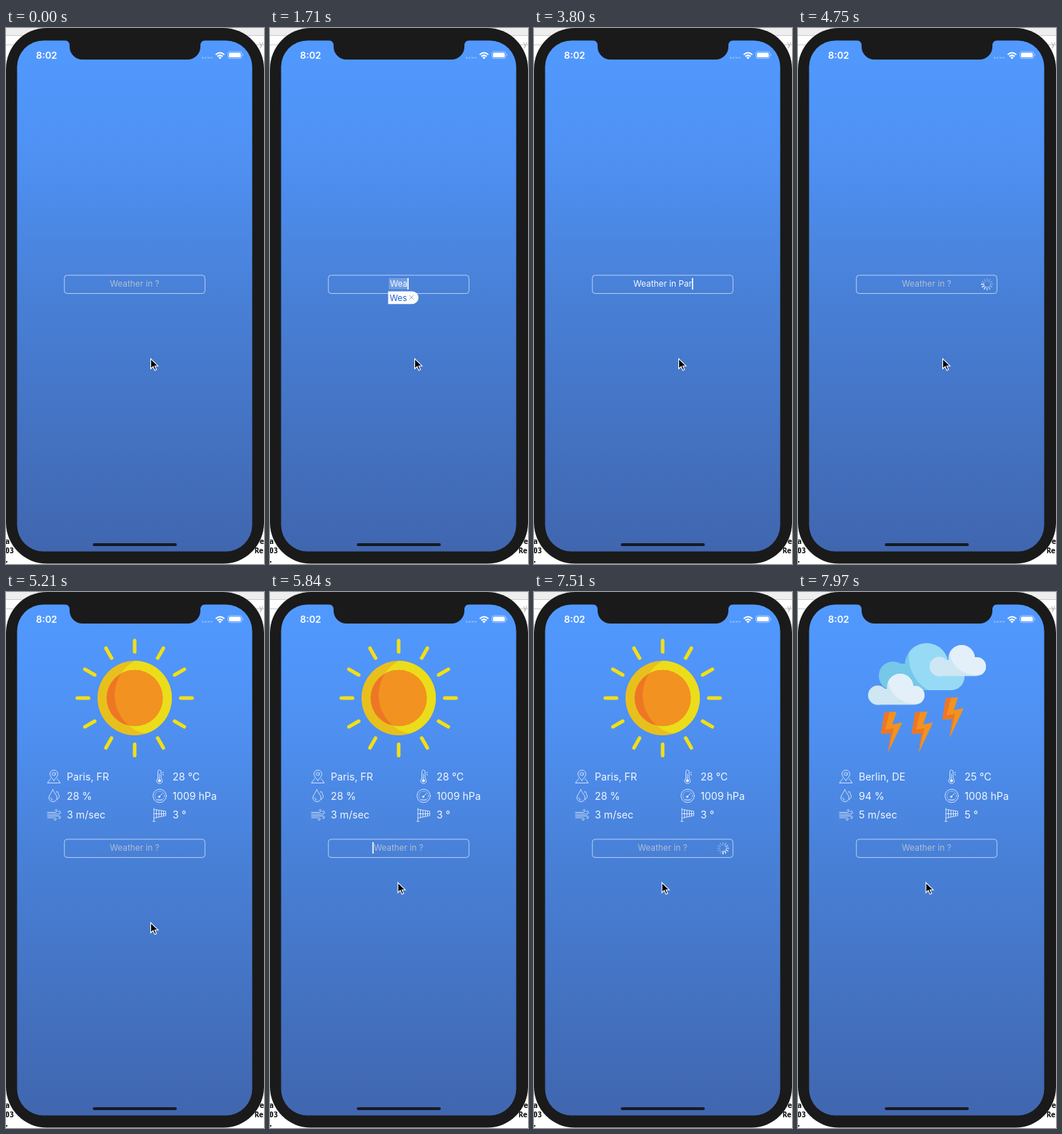
These frames come from a looping animation (361 px wide and 748 px high, 8000 ms). An HTML page:

```html
<!DOCTYPE html>
<html lang="en">
<head>
<meta charset="utf-8">
<title>Weather</title>
<style>
  html, body { margin: 0; width: 100%; height: 100%; overflow: hidden; background: #f4f4f4; }
  svg { display: block; width: 361px; height: 748px; font-family: Inter, "Open Sans", sans-serif; }
  .line { fill: none; stroke: #fff; stroke-opacity: .8; stroke-width: .9; stroke-linecap: round; stroke-linejoin: round; }
  .label { fill: #fff; fill-opacity: .93; font-size: 14.2px; }
  .field { font-size: 11.8px; text-anchor: middle; }
  .log { font: bold 10px "DejaVu Sans Mono", monospace; }
</style>
</head>
<body>
<svg viewBox="0 0 361 748">
  <defs>
    <linearGradient id="sky" x2="0" y2="1">
      <stop offset="0" stop-color="#5199ff"/>
      <stop offset=".22" stop-color="#4f91f3"/>
      <stop offset=".5" stop-color="#4880d7"/>
      <stop offset="1" stop-color="#4066af"/>
    </linearGradient>
    <clipPath id="sunLight"><circle cx="207" cy="144" r="55"/></clipPath>
    <clipPath id="cloudLight"><circle cx="211" cy="89" r="56"/></clipPath>
    <clipPath id="puffLight"><circle cx="249" cy="78" r="38"/></clipPath>
    <g id="backCloud">
      <circle cx="180" cy="102" r="30.5"/><circle cx="133" cy="117" r="20"/>
      <circle cx="214" cy="118" r="19"/><rect x="131" y="100" width="83" height="37"/>
    </g>
    <g id="puffShape">
      <circle cx="229" cy="92.500" r="18.500"/><circle cx="197.500" cy="104" r="13.500"/>
      <circle cx="250" cy="104" r="13"/><rect x="197" y="95" width="53" height="22.300"/>
    </g>
    <g id="puff">
      <use href="#puffShape" fill="#cfe7f3"/>
      <use href="#puffShape" fill="#e3f0f9" clip-path="url(#puffLight)"/>
    </g>
    <g id="bolt">
      <path fill="#f29220" d="M121 168 138 167 132 185 146 182 126 224 130 197 116 198Z"/>
      <path fill="#ee7624" d="M121 168 128 167.600 122 192 134 190 126 224 130 197 116 198Z"/>
    </g>
  </defs>

  <!-- Desktop showing around the device corners -->
  <rect width="361" height="748" fill="#fff"/>
  <rect width="361" height="11" fill="#eee"/>
  <path d="M0 10.500H361M0 23.500H361" stroke="#ccc"/>
  <g class="log">
    <text x="-1" y="720">a</text><text x="-1" y="733">03</text><text x="-2" y="746">.</text>
    <text x="355" y="720">e</text><text x="348" y="733">Re</text>
    <text x="354" y="26" fill="#aaa" style="font-weight:400">y</text>
  </g>

  <rect width="361" height="747.500" rx="57" fill="#1a1a1a"/>
  <rect x="15.500" y="17.500" width="329" height="713" rx="37" fill="url(#sky)"/>
  <path fill="#1a1a1a" d="M81 17Q89 17 89 25V26A18 18 0 0 0 107 44H254A18 18 0 0 0 272 26V25Q272 17 280 17Z"/>
  <rect x="121.500" y="719" width="117.500" height="4" rx="2" fill="#171a20"/>

  <!-- Status bar -->
  <text x="42" y="42.500" fill="#fff" font-size="13.200" font-weight="600">8:02</text>
  <g fill="#fff">
    <path d="M274 41.500H289" stroke="#fff" stroke-opacity=".35" stroke-width="2" stroke-dasharray="2.500 1.600"/>
    <g fill="none" stroke="#fff" stroke-width="2">
      <path d="M293.500 37.200Q299.500 31.800 305.500 37.200M295.800 39.700Q299.500 36.500 303.200 39.700"/>
    </g>
    <path d="M297.300 41.200Q299.500 39.300 301.700 41.200L299.500 43.500Z"/>
    <rect x="310.500" y="33" width="19.500" height="9.500" rx="2.800" fill="none" stroke="#fff" stroke-opacity=".45"/>
    <rect x="312" y="34.500" width="16.500" height="6.500" rx="1.500"/>
    <path d="M331 36.200Q333 37.700 331 39.200Z" fill-opacity=".5"/>
  </g>

  <g id="sun">
    <g id="rays" stroke="#f2df16" stroke-width="5" stroke-linecap="round"/>
    <circle cx="180" cy="148" r="52" fill="#e8c01d"/>
    <circle cx="180" cy="148" r="52" fill="#ecdd1a" clip-path="url(#sunLight)"/>
    <circle cx="180" cy="148" r="39.300" fill="#ee7624"/>
    <circle cx="180" cy="148" r="39.300" fill="#f29220" clip-path="url(#sunLight)"/>
  </g>

  <g id="storm">
    <use href="#backCloud" fill="#76c8e8"/>
    <use href="#backCloud" fill="#97daf6" clip-path="url(#cloudLight)"/>
    <use href="#puff"/>
    <use href="#puff" x="-86" y="40"/>
    <use href="#bolt"/><use href="#bolt" x="43"/><use href="#bolt" x="86" y="-20"/>
  </g>

  <g id="report">
    <g class="line">
      <path d="M67 263C64 259 61.500 257 61.500 254A5.500 5.500 0 0 1 72.500 254C72.500 257 70 259 67 263ZM62.500 260.500 58 266.500H76L71.500 260.500"/>
      <circle cx="67" cy="254" r="2.300"/>
      <path d="M65.500 276C63 281 60 284 60 287A5.700 5.700 0 0 0 71.400 287C71.400 284 68 281 65.500 276ZM70.500 279.500 71.500 278C73 281 74.500 283 74.500 285.500Q74.500 288 71.500 289.500M62.500 287Q63 290 65.500 290.500"/>
      <path d="M58 307.500H69Q72 307 71.500 304.500Q70.500 302.500 68.500 304.500M58 310H74Q77 309.500 76 306.500Q74.500 304.500 73 306.500M58 312.500H74Q77 313 76 315.500Q74.500 317 73 315M58 315H68Q71 315.500 70 318Q68.500 319.500 67 317.500"/>
      <path d="M212.500 260V251Q212.500 248.500 214.700 248.500Q217 248.500 217 251V260A4 4 0 1 1 212.500 260ZM214.700 254V262M219 252H220.500M219 255H220.500"/>
      <circle cx="214.700" cy="263.300" r="1.700" fill="#fff"/>
      <circle cx="215" cy="284.500" r="9.300"/>
      <circle cx="215" cy="284.500" r="6.500" stroke-dasharray=".8 2.200"/>
      <path d="M214 286 219 281M211 290H219"/>
      <circle cx="214.300" cy="285.800" r="1.200"/>
      <path d="M207 302V320M205.500 320H208.500M207 303.500 223.500 306V312L207 315.500M210.500 304V314.700M214 304.600V314M217.500 305.200V313.200M220.500 305.600V312.600M207 309.500H223"/>
    </g>
    <g id="labels" class="label"></g>
  </g>

  <rect x="81.700" y="345" width="196.700" height="25.500" rx="4" fill="none" stroke="#fff" stroke-opacity=".6"/>
  <rect id="marked" y="349" height="15.500" fill="#fff" fill-opacity=".22"/>
  <text id="entry" class="field" x="180" y="361.300"></text>
  <rect id="caret" y="349" width="1.700" height="16" fill="#fff"/>
  <g id="spinner" stroke="#fff" stroke-width="1.500" stroke-linecap="round"/>

  <g id="suggestion">
    <path d="M165.300 367.500H199A8.800 8.800 0 0 1 199 385.200H165.300Z" fill="#fbfbfd"/>
    <text x="167.500" y="380.500" fill="#2163cf" font-size="11.800">Wes</text>
    <path d="M195 373 201 379M201 373 195 379" stroke="#a9adb5"/>
  </g>

  <path id="pointer" d="M0 0V14L3.300 11 5.700 16.300 8 15.300 5.700 10.200H10.300Z" fill="#000" stroke="#fff" stroke-width="1.100"/>
</svg>

<script>
const LOOP = 8000;
const $ = id => document.getElementById(id);
const show = (id, on) => $(id).style.display = on ? "" : "none";

function svg(tag, parent, attributes) {
  const node = document.createElementNS("http://www.w3.org/2000/svg", tag);
  for (const key in attributes) node.setAttribute(key, attributes[key]);
  return parent.appendChild(node);
}

function spokes(id, x, y, inner, outer) {
  return Array.from({ length: 12 }, (_, i) => svg("path", $(id), {
    d: `M0 ${-inner}V${-outer}`, transform: `translate(${x} ${y}) rotate(${i * 30})`
  }));
}

spokes("rays", 180, 148, 64.5, 80.3);
const blades = spokes("spinner", 264.5, 357.5, 4.5, 7.9);
const labels = Array.from({ length: 6 }, (_, i) => svg("text", $("labels"), {
  x: i % 2 ? 233 : 85, y: [263, 289.7, 316][i >> 1]
}));

const reports = {
  sun: ["Paris, FR", "28 °C", "28 %", "1009 hPa", "3 m/sec", "3 °"],
  storm: ["Berlin, DE", "25 °C", "94 %", "1008 hPa", "5 m/sec", "5 °"]
};

// Each state: start time, typed text, whether the field has focus
const states = [[0, "", false], [450, "", true]];
function type(text, times) {
  times.forEach((time, i) => states.push([time, text.slice(0, i + 1), true]));
}
type("Weather in Paris", [980, 1260, 1540, 1860, 2020, 2180, 2330, 2500, 2640, 2760, 2900,
  3320, 3500, 3660, 3820, 3980]);
states.push([4420, "", false], [5740, "", true]);
type("Berlin", [6360, 6560, 6740, 6920, 7060, 7200]);
states.push([7400, "", false]);

function drawField(t) {
  const [start, text, focused] = states.findLast(state => state[0] <= t);
  const entry = $("entry");
  entry.textContent = (text || "Weather in ?").replace(/ /g, "\u00a0");
  entry.setAttribute("fill", text ? "#fff" : "#c3c8ce");
  entry.setAttribute("fill-opacity", text ? .95 : .85);

  const width = entry.getComputedTextLength();
  const left = 180 - width / 2;
  $("caret").setAttribute("x", text ? left + width : left - 2);
  show("caret", focused && (t - start) % 1000 < 500);

  const suggesting = text === "Wea";
  show("suggestion", suggesting);
  show("marked", suggesting);
  $("marked").setAttribute("x", left - 1.5);
  $("marked").setAttribute("width", width + 1.5);
}

function drawSpinner(t) {
  show("spinner", t >= 4420 && t < 5150 || t >= 7400 && t < 7720);
  const head = Math.floor(t / 1000 * 12);
  blades.forEach((blade, i) => {
    const age = ((head - i) % 12 + 12) % 12;
    blade.setAttribute("stroke-opacity", Math.max(.25, .95 - age * .11));
  });
}

function drawReport(t) {
  const kind = t < 5150 ? null : t < 7720 ? "sun" : "storm";
  show("sun", kind === "sun");
  show("storm", kind === "storm");
  show("report", kind);
  if (kind) labels.forEach((label, i) => label.textContent = reports[kind][i]);
}

function drawPointer(t) {
  const p = Math.min(1, Math.max(0, (t - 5250) / 400));
  const eased = p * p * (3 - 2 * p);
  $("pointer").setAttribute("transform", `translate(${202.5 - 23.5 * eased} ${461.5 - 56 * eased})`);
}

function draw(now) {
  const t = now % LOOP;
  drawField(t);
  drawSpinner(t);
  drawReport(t);
  drawPointer(t);
}

const began = performance.now();
function frame() {
  draw(performance.now() - began);
  requestAnimationFrame(frame);
}
frame();
</script>
</body>
</html>
```
